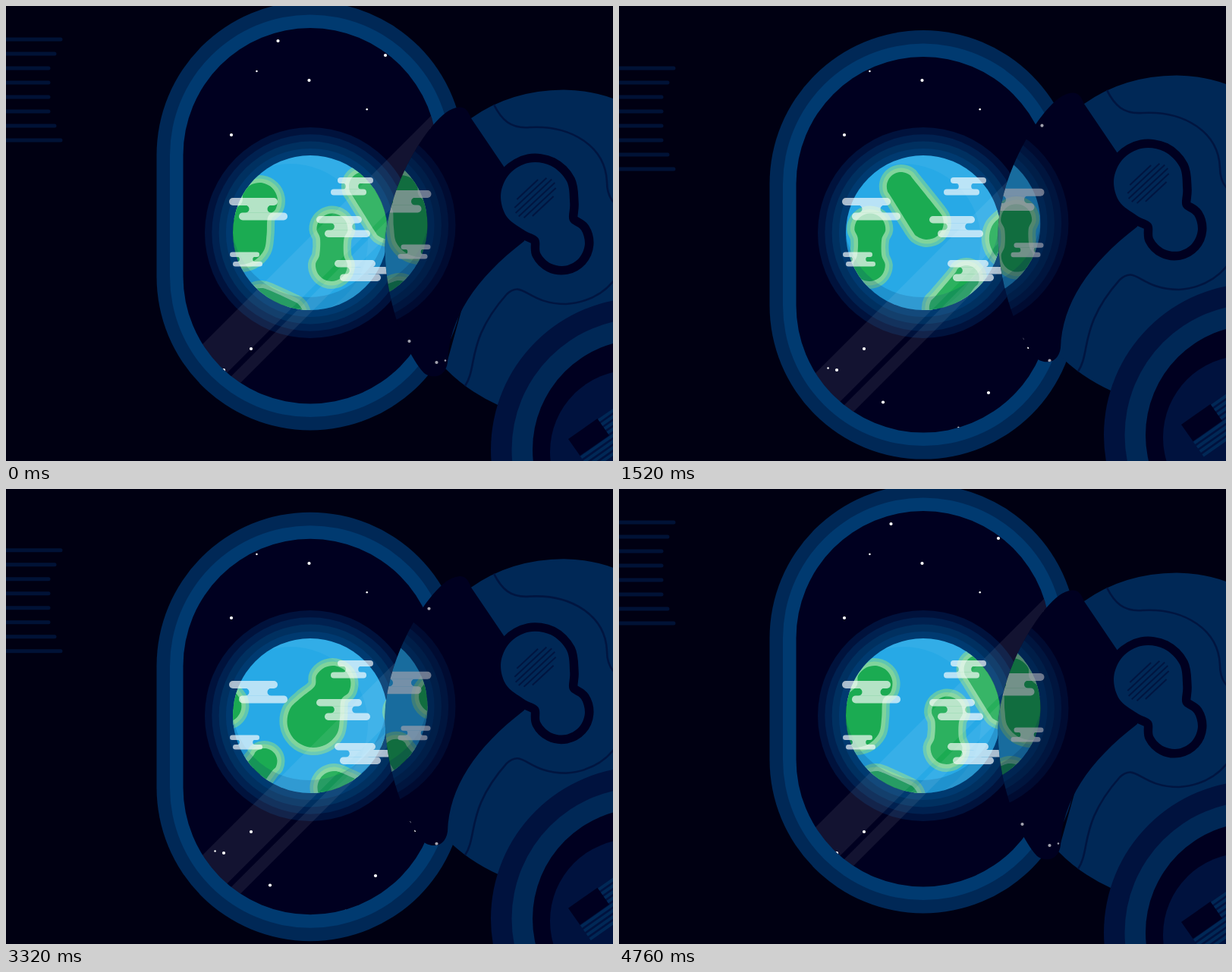
Animation of 800x600 px, one loop 4.8 s. Source, as an HTML page:

```html
<!DOCTYPE html>
<html lang="en">
<head>
<meta charset="utf-8">
<title>Earth through the porthole</title>
<style>
  html, body { margin: 0; height: 100%; overflow: hidden; background: #000012; }
  svg { display: block; width: 100%; height: 100%; }
</style>
</head>
<body>
<svg viewBox="0 0 800 600">
  <defs>
    <clipPath id="globe"><circle cx="401" cy="299" r="102"/></clipPath>
    <clipPath id="pane"><rect id="paneShape" x="233.5" y="29" width="335" height="495.5" rx="167.5"/></clipPath>
    <path id="visorShape" d="M613 148 C609 137 604 133 597 133.500 C585 134.500 575 143 562 158
      C527 200 500 266 499.500 318 C499.500 372 515 424 533 458 C541 472 548 482 553 485.500
      C563 491 579 490 582 470 C584 412 618 360 683 310 L700 250 L657 213 Z"/>
    <clipPath id="visorClip"><use href="#visorShape"/></clipPath>
  </defs>

  <g id="wall" fill="none" stroke="#001236" stroke-width="5" stroke-linecap="round"></g>
  <g id="frame"></g>

  <g clip-path="url(#pane)">
    <g id="space">
      <g id="stars" fill="#fff"></g>
      <g id="glow"></g>
      <g clip-path="url(#globe)">
        <rect x="299" y="197" width="204" height="204" fill="#27a9e6"/>
        <g id="land"></g>
        <g fill-rule="evenodd">
          <path d="M299 197 H503 V401 H299 Z M273 310 a102 102 0 0 0 204 0 a102 102 0 0 0 -204 0 Z"
            fill="#fff" fill-opacity=".05"/>
          <path d="M299 197 H503 V401 H299 Z M297 282 a102 102 0 0 0 204 0 a102 102 0 0 0 -204 0 Z"
            fill="#003a70" fill-opacity=".2"/>
        </g>
      </g>
      <g id="clouds" fill="#fff"></g>
    </g>
    <g id="glare" fill="#fff" fill-opacity=".075">
      <path d="M705 0 H775 L175 600 H105 Z"/>
      <path d="M785 0 H806 L206 600 H185 Z"/>
    </g>
  </g>

  <g id="astronaut">
    <path fill="#002856" d="M613 148 Q665 111 735 110.500 Q770 111 800 122 V680 H700 L650 527 Q608 508 579 478 L620 330 Z"/>
    <g fill="none" stroke="#001540" stroke-width="2.600">
      <path d="M643 130 C653 150 665 162 690 160 C745 157 790 185 792 232 Q792 250 802 260"/>
      <path d="M605 501 C622 476 606 441 660 380 C682 360 686 393 738 393 Q779 390 802 361"/>
    </g>
    <use href="#visorShape" fill="#000020"/>
    <g clip-path="url(#visorClip)"><g id="reflection" opacity=".64"><use href="#space"/></g></g>
    <path id="earpiece" fill="#002856" stroke="#000020" stroke-width="23" paint-order="stroke"/>
    <g id="grille" transform="translate(697.500 253) rotate(-43)" stroke="#001540" stroke-width="2"></g>
    <g id="arm"></g>
    <circle cx="825" cy="588" r="108" fill="#00123e"/>
    <g id="patch" transform="translate(741 571) rotate(-35)" fill="#002856">
      <rect width="47" height="27" fill="#000020"/>
    </g>
  </g>
</svg>

<script>
const LOOP = 4800, LAND_WIDTH = 313;
const $ = id => document.getElementById(id);
const add = (id, markup) => $(id).insertAdjacentHTML('beforeend', markup);
const move = (id, x, y, extra = '') => $(id).setAttribute('transform', `translate(${x} ${y}) ${extra}`);
const repeat = (n, make) => { for (let i = 0; i < n; i++) make(i); };
const disc = (id, x, y, r, fill = '') => add(id, `<circle cx="${x}" cy="${y}" r="${r}" ${fill && `fill="${fill}"`}/>`);

// Closed smooth curve through points
function smooth(points) {
  const at = i => points.at(i % points.length);
  return points.reduce((d, b, i) => {
    const a = at(i - 1), c = at(i + 1), e = at(i + 2);
    const out = b.map((v, k) => v + (c[k] - a[k]) / 6);
    const into = c.map((v, k) => v - (e[k] - b[k]) / 6);
    return d + `C${out} ${into} ${c}`;
  }, 'M' + points[0]) + 'Z';
}

// Two discs joined by a waist; a smaller spread in degrees pinches it more
function peanut([x1, y1, r1, x2, y2, r2, spread]) {
  const axis = Math.atan2(y2 - y1, x2 - x1), open = spread * Math.PI / 180, steps = 7;
  const points = [];
  const cap = (x, y, r, facing) => repeat(steps + 1, i => {
    const a = facing + open + (2 * Math.PI - 2 * open) * i / steps;
    points.push([x + r * Math.cos(a), y + r * Math.sin(a)]);
  });
  cap(x1, y1, r1, axis);
  cap(x2, y2, r2, axis + Math.PI);
  return smooth(points);
}

const bar = (x, y, w, h) => `<rect x="${x}" y="${y}" width="${w}" height="${h}" rx="${h / 2}"/>`;

// Two shifted bars joined by a neck with a round notch at each side
function cloud(x, y, w, h, shift, extra = '') {
  const top = y + h * .97, low = y + h * 1.97, r = h / 2;
  const left = x + Math.max(shift, 0) + h * .85, right = x + w + Math.min(shift, 0) - h * .85;
  add('clouds', `<g opacity=".67">${bar(x, y, w, h)}${bar(x + shift, y + h * 1.94, w, h)}
    <path d="M${left} ${top} H${right} A${r} ${r} 0 0 0 ${right} ${low} H${left} A${r} ${r} 0 0 0 ${left} ${top}Z"/>${extra}</g>`);
}

// Small repeatable random generator
let seed = 7;
const random = () => (seed = seed * 16807 % 2147483647) / 2147483647;

repeat(8, i => add('wall', `<path d="M-5 ${44 + 19 * i} H${56 + 8 * Math.max(0, Math.abs(i - 3.5) - 1.5)}"/>`));

['#002856', '#003a70', '#000020'].forEach((fill, i) => {
  const pad = 35 - 17.5 * i;
  add('frame', `<rect x="${233.5 - pad}" y="${29 - pad}" width="${335 + 2 * pad}"
    height="${495.5 + 2 * pad}" rx="${167.5 + pad}" fill="${fill}"/>`);
});

['#00123c', '#002150', '#003060', '#003a70'].forEach((fill, i) => disc('glow', 401, 299, 139 - 9.3 * i, fill));
['#00123e', '#002856', '#000020'].forEach((fill, i) => disc('arm', 839.5, 585, 200.5 - 27.5 * i, fill));

const brightStars = [[358.5, 46], [500, 65], [399.5, 98], [297, 170], [323, 452], [287, 480], [348, 522.5], [487, 510]];
brightStars.forEach(([x, y]) => disc('stars', x, y, 2.1));
repeat(14, i => disc('stars', 235 + 330 * random(), 40 + 38 * (i + random()), 1.25));

const continents = [
  [334, 257, 24, 309, 306, 35, 55],
  [430, 294, 20.5, 429, 342, 21, 50],
  [471, 238, 19, 505, 286, 22, 80],
  [557, 359, 17, 527, 398, 19, 70],
  [336, 394, 22, 372, 408, 20, 85]
].map(peanut);
repeat(2, lap => continents.forEach(d => add('land', `<g transform="translate(${lap * LAND_WIDTH})">
  <path d="${d}" stroke="#5fc6b0" stroke-width="20"/>
  <path d="${d}" fill="#1bab52" stroke="#80d49c" stroke-width="11" paint-order="stroke"/></g>`)));

cloud(294, 253, 64, 10, 13);
cloud(437, 226, 47, 8, -9);
cloud(409, 277, 60, 9.5, 11);
cloud(433, 335, 54, 9.5, 7, bar(465, 344, 43, 9.5));
cloud(295, 324.5, 39, 6.5, 4);

$('earpiece').setAttribute('d', peanut([698, 252, 46, 732, 312, 31, 50]));
repeat(6, i => {
  const y = i * 6 - 15, half = Math.sqrt(33 ** 2 - (1.8 * y) ** 2);
  add('grille', `<path d="M${-half} ${y} H${half}"/>`);
});
repeat(8, i => add('patch', `<rect x="${i < 4 ? 47 : 0}" y="${1 + 6.7 * i}" width="100" height="4"/>`));

// cubic-bezier(.6, 0, .4, 1)
function ease(p) {
  let lo = 0, hi = 1;
  repeat(24, () => {
    const s = (lo + hi) / 2, q = 1 - s;
    if (1.8 * s * q * q + 1.2 * s * s * q + s ** 3 < p) lo = s; else hi = s;
  });
  return lo * lo * (3 - 2 * lo);
}

function draw(now) {
  const t = now % LOOP / LOOP;
  const drift = ease(1 - Math.abs(1 - 2 * t));
  const sink = 48.5 * drift, rise = sink / 2;
  for (const id of ['wall', 'frame', 'paneShape', 'glare']) move(id, 0, sink);
  move('astronaut', 0, -rise);
  move('reflection', 854.5, rise - 10 - 3 * drift, 'scale(-1 1)');
  move('land', -LAND_WIDTH * t, 0);
}

const start = performance.now();
function tick() {
  draw(performance.now() - start);
  requestAnimationFrame(tick);
}
tick();
</script>
</body>
</html>
```
